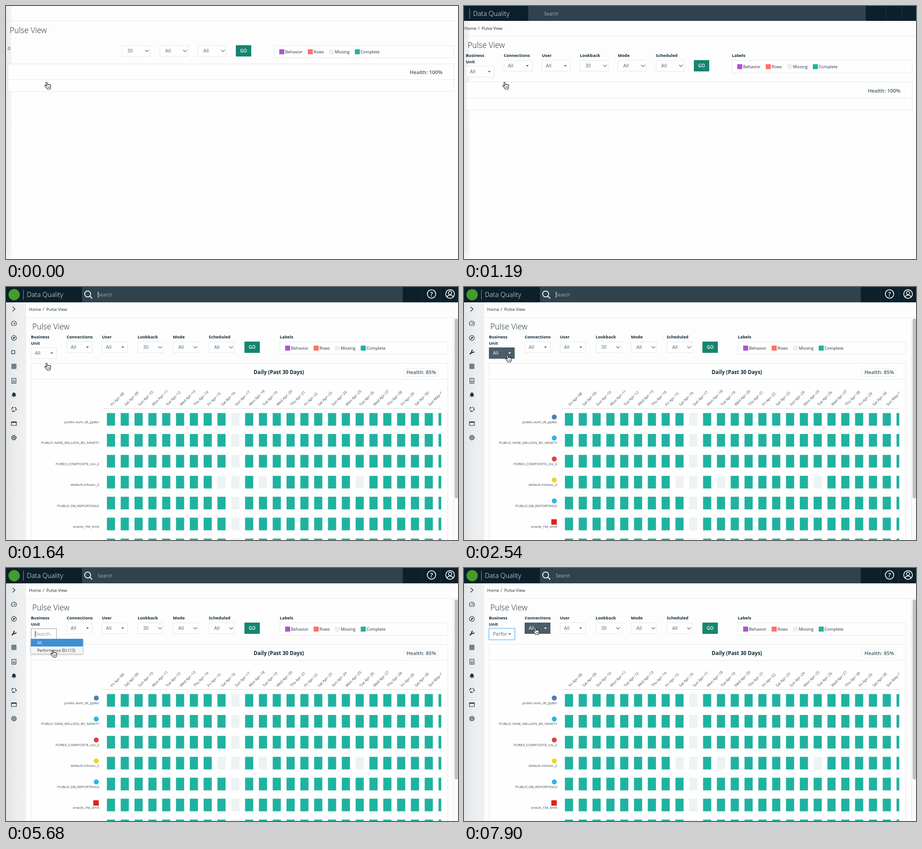
Write an HTML page that moves like this. It is 999 by 561 pixels and loops after 8 s.

```html
<!DOCTYPE html>
<html lang="en">
<head>
<meta charset="utf-8">
<title>Pulse View</title>
<style>
  html, body { margin: 0; width: 100%; height: 100%; overflow: hidden; background: #fdfdfd; }
  svg { display: block; width: 999px; height: 561px; font-family: "Open Sans", sans-serif; }
  text { white-space: pre; }
  .icon { fill: none; stroke: #1c323e; stroke-width: 1.2; }
  .icon .solid { fill: #1c323e; }
</style>
</head>
<body>
<svg id="stage" viewBox="0 0 999 561">
  <defs>
    <linearGradient id="side"><stop stop-color="#e2e4e6"/><stop offset=".6" stop-color="#eceeef"/><stop offset="1" stop-color="#eff0f1"/></linearGradient>
    <linearGradient id="sliver"><stop stop-color="#ececec"/><stop offset="1" stop-color="#f4f4f4"/></linearGradient>
    <clipPath id="chart"><rect x="216" y="206" width="746" height="355"/></clipPath>
    <filter id="soft" x="-10%" y="-20%" width="120%" height="150%"><feDropShadow dx="0" dy="1.5" stdDeviation="1.5" flood-opacity=".22"/></filter>
  </defs>
</svg>
<script>
const LOOP = 8000;
const INK = '#142b37', GREY = '#53656f', LINE = '#e3e6e7', TEAL = '#20b2a0', BLANK = '#edf2f2';
const BOLD = 'font-weight="700"', LIGHT = 'font-weight="300"';

const rect = (x, y, w, h, fill, more = '') =>
  `<rect x="${x}" y="${y}" width="${w}" height="${h}" fill="${fill}" ${more}/>`;
const frame = (x, y, w, h, fill = '#fefefe', stroke = LINE, more = '') =>
  rect(x + .5, y + .5, w - 1, h - 1, fill, `stroke="${stroke}" ${more}`);
const text = (x, y, s, size = 9.33, fill = INK, more = '') =>
  `<text x="${x}" y="${y}" font-size="${size}" fill="${fill}" ${more}>${s}</text>`;
const path = (d, stroke, width = 1, fill = 'none') =>
  `<path d="${d}" fill="${fill}" stroke="${stroke}" stroke-width="${width}"/>`;
const circle = (x, y, r, fill, more = '') => `<circle cx="${x}" cy="${y}" r="${r}" fill="${fill}" ${more}/>`;
const at = (x, y, s, cls = '') => `<g transform="translate(${x} ${y})" class="${cls}">${s}</g>`;
// Shown only during the given "from-to" spans, in ms.
const on = (spans, s) => `<g data-on="${spans}">${s}</g>`;

// Filter row geometry for the three stages of loading.
const bare = { x: 4, step: 84, w: 63, y: 87, go: 508, legend: 592, right: 991, title: 8 };
const plain = { ...bare, y: 120 };
const empty = { x: 55, step: 79.8, w: 58, y: 121, go: 533, legend: 613, right: 991, title: 58 };
const full = { x: 55, step: 78.6, w: 57, y: 121, go: 527, legend: 605, right: 977, title: 58 };
const col = (l, i) => Math.round(l.x + l.step * i);

function labels(l) {
  const names = ['Business', 'Connections', 'User', 'Lookback', 'Mode', 'Scheduled'];
  return names.map((n, i) => text(col(l, i), l.y - 7, n, 9.33, INK, BOLD)).join('')
    + text(l.x, l.y + 6.5, 'Unit', 9.33, INK, BOLD)
    + text(l.legend, l.y - 7, 'Labels', 9.33, INK, BOLD);
}

function picker(x, y, w, s, fill = '#fefefe', ink = GREY, stroke = LINE) {
  return frame(x, y, w, 25, fill, stroke) + text(x + 9, y + 16, s, 10.67, ink)
    + `<path d="M${x + w - 14} ${y + 11}h6l-3 3.4z" fill="${ink}"/>`;
}

function select(x, y, w, s) {
  const c = x + w - 7.5;
  return frame(x, y, w, 25) + text(x + 12, y + 16, s, 10.67, GREY)
    + path(`M${c - 4} ${y + 10.5}l4 4 4-4`, '#5a6870', 1.2);
}

function filters(l) {
  const keys = [['Behavior', 12, '#aa55cc'], ['Rows', 75, '#ff6f69'], ['Missing', 122, '#eceff0'], ['Complete', 179, TEAL]];
  return text(l.title, l.y - 27, 'Pulse View', 17.4, INK, LIGHT)
    + ['30', 'All', 'All'].map((s, i) => select(col(l, i + 3), l.y, l.w, s)).join('')
    + rect(l.go, l.y, 34, 25, '#158570')
    + text(l.go + 17, l.y + 16, 'GO', 10, '#fff', 'text-anchor="middle" font-weight="600"')
    + frame(l.legend, l.y, l.right - l.legend, 29)
    + keys.map(([s, dx, c]) => rect(l.legend + dx, l.y + 9, 11, 11, c) + text(l.legend + dx + 12.7, l.y + 18, s, 9.33, '#22353f')).join('');
}

const pickers = l => picker(col(l, 1), l.y, l.w, 'All') + picker(col(l, 2), l.y, l.w, 'All');
const unitPicker = l => picker(l.x, l.y + 13, l.w, 'All');

function panel(l, y, h, split, base, health, pill) {
  const end = l.right - 26.5;
  return frame(l.x, y, l.right - l.x, h) + rect(l.x, split, l.right - l.x, 1, LINE)
    + (pill ? frame(pill, base - 13, end + 5 - pill, 19, '#fefefe', '#e6eaec', 'rx="6"') : '')
    + text(end, base, 'Health: ' + health, 11.4, '#455a66', 'text-anchor="end" font-weight="600"');
}

function crumbs(x, y) {
  return text(x, y, 'Home') + text(x + 30, y, '/') + text(x + 38, y, 'Pulse View') + rect(0, y + 13, 999, 1, '#e6e8e9');
}

function header(h, x0, x1, dividers, rule, search) {
  return rect(0, 0, 999, h, '#0b202b') + rect(x0, 0, x1 - x0, h, '#2f424e')
    + dividers.map(x => rect(x, 0, 1, h, '#1c323e')).join('')
    + rect(rule, 6, 1, 22, '#8d9aa1')
    + text(rule + 8, 22, 'Data Quality', 14.67, '#fff', LIGHT)
    + text(search, 20.5, 'Search', 10.1, '#a9b4ba');
}

const sliver = y => rect(0, y, 12, 548 - y, 'url(#sliver)') + rect(0, 548, 11, 13, '#f3f3f3');

const icons = {
  49: path('M-3-5l5.5 5-5.5 5', '#1c323e', 1.4),
  81: '<path d="M-4 4a5.6 5.6 0 1 1 8 0zM0 1l3-3M-3.5 0h1.2M-1-3.6l.4 1"/>',
  113: circle(0, 0, 5.4, 'none') + '<path class="solid" stroke="none" d="M3-3L1.2 1.2-3 3-1.2-1.2z"/>',
  176: '<path d="M-4.5-5h9V5h-9zM-4.5-2h9M-4.5 1.5h9M-1.5-5V5M1.5-5V5"/>',
  208: '<path d="M-4.5-5.5h9v11h-9zM-2.5 3h5M-2.5.7h5M-1-2.7h2"/>',
  239: '<path class="solid" stroke="none" d="M-5 3.2C-3.5 1.5-4-.5-3.5-2.3A3.4 3.4 0 0 1-.7-4.8a.8.8 0 0 1 1.4 0A3.4 3.4 0 0 1 3.5-2.3C4-.5 3.5 1.5 5 3.2zM-1.5 4h3a1.5 1.5 0 0 1-3 0z"/>',
  271: '<path d="M-4.6 1.5A4.8 4.8 0 0 1-2.4-4.1M1-4.7A4.8 4.8 0 0 1 4.7 1.2M3 3.7A4.8 4.8 0 0 1-3 3.7M-4.6-3.2l2.4-1.2.4 2.4M3 .2l1.8 1.4L6.2-.2M-.6 3l-2.6.6.6 2.4"/>',
  303: '<path d="M-5.5-4h11v8h-11z"/><path class="solid" stroke="none" d="M-5.5-4.5h11v2.4h-11z"/>',
  334: circle(0, 0, 4.3, 'none') + circle(0, 0, 5.3, 'none', 'stroke-dasharray="2.1 2.06"') + circle(0, 0, 1.7, 'none')
};

const shell = header(34, 168, 877, [920, 960], 38, 203)
  + circle(18, 17, 12.5, '#439c2c')
  + circle(180.5, 15.5, 6.6, 'none', 'stroke="#fff" stroke-width="1.8"') + path('M185 20l5.5 5.5', '#fff', 2)
  + circle(940.5, 15.5, 9.3, 'none', 'stroke="#fff" stroke-width="1.7"')
  + text(940.5, 20.5, '?', 14, '#fff', 'text-anchor="middle" font-weight="600"')
  + circle(981.5, 15.5, 9.6, 'none', 'stroke="#fff" stroke-width="1.7"')
  + circle(981.5, 13, 3.6, 'none', 'stroke="#fff" stroke-width="1.6"') + path('M975 22.5c1-6 12-6 13 0', '#fff', 1.6)
  + rect(0, 34, 44, 527, 'url(#side)') + rect(43, 34, 1, 527, '#e2e5e6')
  + Object.entries(icons).map(([y, s]) => at(17.5, y, s, 'icon')).join('')
  + on('1340-1790', at(16, 144.5, rect(-3.5, -3.5, 7, 7, 'none'), 'icon'))
  + on('1790-8000', at(17.5, 144.5, path('M-4.6 4.6L1-1', '#1c323e', 2.8) + path('M2-4.6A2.7 2.7 0 1 0 4.8-1.6', '#1c323e', 2)))
  + rect(44, 67, 955, 1, '#e6e8e9') + text(51, 53.3, 'Home') + text(81, 53.3, '/') + text(89, 53.3, 'Pulse View')
  + on('1340-2090 2540-2990 3440-3740', rect(203, 10, 1, 14, '#dfe5e8'));

function chart() {
  const days = ['Fri', 'Sat', 'Sun', 'Mon', 'Tue', 'Wed', 'Thu'];
  const rows = ['public.aum_dt_pjdbc', 'PUBLIC.NINE_MILLION_BY_NINETY', 'FOREX_COMPOSITE_csv_2',
    'default.infosec_2', 'PUBLIC.DB_REPORTING2', 'oracle_1M_limit', ''];
  const marks = ['#4a7fb0', '#29b5e8', '#d9453a', '#f5d21f', '#29b5e8'];
  let cells = '', names = '', badges = '';
  for (let c = 0; c < 25; c++) {
    const x = 223 + c * 30.54, d = c + 8;
    const date = d > 30 ? 'May−0' + (d - 30) : 'Apr−' + String(d).padStart(2, '0');
    cells += text(0, 0, days[c % 7] + ' ' + date, 8, '#3b4a52', `transform="translate(${x + 11.5} 264) rotate(-45)"`);
    rows.forEach((_, r) => {
      const gap = c === 9 || (r === 3 && [8, 11, 18].includes(c));
      cells += rect(x, 279.5 + r * 46.4, 18, 28, gap ? BLANK : TEAL);
    });
  }
  rows.forEach((s, r) => names += text(206, 302 + r * 46.4, s, 8, '#3b4a52', 'text-anchor="end"'));
  marks.forEach((m, r) => badges += circle(199.5, 288.3 + r * 46.5, 5.5, m));
  badges += rect(193, 515, 12, 12, '#e2231a');
  return text(603, 193, 'Daily (Past 30 Days)', 11.5, INK, 'text-anchor="middle" ' + BOLD)
    + rect(216, 269, 746, 1, '#d6dadc') + `<g clip-path="url(#chart)">${cells}</g>` + names + on('1790-8000', badges);
}

const menu = `<g filter="url(#soft)">${frame(54, 157, 117, 34, '#fff', '#c6c9cb', 'rx="1.5"')}</g>`
  + rect(55, 157, 115, 17, '#3f8fd2') + on('4640-7170', rect(55, 174, 115, 16, '#f3f3f3'))
  + text(69, 169, 'All', 8.67, '#fff') + text(69, 185.5, 'Performance BU (13)', 8.67, '#2c3a42');

const dark = (x, y, s) => picker(x, y, 57, s, '#4a5d69', '#fff', '#4a5d69');
const faded = s => `<g opacity=".5">${s}</g>`;

const unit = on('1640-3740', unitPicker(full))
  + on('2090-2240', faded(dark(55, 134, 'All')))
  + on('2240-3740', dark(55, 134, 'All'))
  + on('3740-7170', frame(55, 134, 57, 25, '#fff', '#8f9aa1') + text(64, 150, 'Search.', 10.67, '#8b9297')
    + on('3890-4340 4780-5230 5680-6280 6730-7170', rect(64, 139, 1, 15, '#222')) + menu)
  + on('7170-8000', rect(54, 133.5, 59, 26, 'none', 'stroke="#007bff" stroke-opacity=".22" stroke-width="2.4" rx="1.5"')
    + picker(55, 134, 57, 'Perfor', '#fefefe', GREY, '#93c5f3'));

const hand = '<g id="hand">'
  + path('M4.6.8C3.5.8 3 1.8 3.3 2.8L5 9.4C3.6 8.2 2.2 7.2 1.1 7.8.3 8.3.6 9.2 1.3 10L5 14.2C5.8 15.2 6 15.6 6.2 16.3H12.2C12.3 15 13.8 13 13.8 10.5V8C13.8 6.4 12 6.2 11.7 7.4 11.6 5.8 9.6 5.6 9.2 6.8 9 5.6 7.4 5.4 6.9 6.4L5.9 2C5.7 1.2 5.3.8 4.6.8Z', '#111', 1.1, '#fff')
  + path('M7.3 10.5l.4 3M9.3 10.3l.2 3M11.3 10.2l-.1 3', '#111', .8) + '</g>';
const beam = '<g id="beam">' + path('M-2.5-6.5Q0-6.5 0-5V5Q0 6.5-2.5 6.5M2.5-6.5Q0-6.5 0-5V5Q0 6.5 2.5 6.5M-1.5 2h3', '#111', 1.2) + '</g>';

document.getElementById('stage').innerHTML += rect(0, 0, 999, 561, '#fdfdfd')
  + on('0-1190', sliver(0) + rect(0, 32, 999, 1, '#e6e8e9') + filters(bare) + panel(bare, 128, 62, 163, 151, '100%')
    + on('0-140', text(4, 97, '()')) + on('140-1190', labels(bare) + text(4, 110, '()')))
  + on('1190-1340', sliver(33) + header(33, 142, 888, [932, 967], 12, 177) + crumbs(1, 52.5) + filters(plain) + labels(plain)
    + pickers(plain) + unitPicker(plain) + panel(plain, 168, 63, 204, 192.3, '100%'))
  + on('1340-8000', shell)
  + on('1340-1640', filters(empty) + labels(empty) + pickers(empty) + unitPicker(empty) + panel(empty, 169, 63, 204, 193.3, '100%', 885))
  + on('1640-8000', filters(full) + labels(full) + pickers(full) + panel(full, 169, 420, 204, 193.3, '85%', 878) + chart()
    + rect(988, 68, 11, 493, '#fafafa') + rect(988, 68, 1, 493, '#e8e8e8') + rect(991.5, 70, 7.5, 399, '#c1c1c1', 'rx="3.7"')
    + on('7760-7900', faded(dark(134, 121, 'All'))) + on('7900-8000', dark(134, 121, 'All')) + unit)
  + hand + beam;

// Pointer moves: [time, from, to, share of the way].
const spots = { rest: [85, 168], unit: [91, 150.5], item: [98.3, 181.5], conn: [152, 131.5] };
const moves = [
  [0, 'rest', 'unit', 0], [1940, 'rest', 'unit', .5], [2090, 'rest', 'unit', 1],
  [4190, 'unit', 'item', .1], [4340, 'unit', 'item', .35], [4490, 'unit', 'item', .65], [4640, 'unit', 'item', .9], [4780, 'unit', 'item', 1],
  [7170, 'item', 'conn', 0], [7320, 'item', 'conn', .1], [7470, 'item', 'conn', .35], [7620, 'item', 'conn', .65],
  [7760, 'item', 'conn', .9], [7900, 'item', 'conn', 1]
];

const timed = [...document.querySelectorAll('[data-on]')].map(el =>
  ({ el, spans: el.dataset.on.split(' ').map(s => s.split('-').map(Number)) }));
const handEl = document.getElementById('hand'), beamEl = document.getElementById('beam');
const show = (el, yes) => { el.style.display = yes ? '' : 'none'; };
const start = performance.now();

function draw() {
  const t = (performance.now() - start) % LOOP;
  for (const { el, spans } of timed) show(el, spans.some(([a, b]) => t >= a && t < b));
  const [, from, to, k] = moves.findLast(m => m[0] <= t);
  const [x, y] = spots[from].map((v, i) => v + (spots[to][i] - v) * k);
  const typing = t >= 3890 && t < 4340;
  show(handEl, !typing);
  show(beamEl, typing);
  handEl.setAttribute('transform', `translate(${x} ${y})`);
  beamEl.setAttribute('transform', `translate(${x + 4.5} ${y + .8})`);
  requestAnimationFrame(draw);
}
draw();
</script>
</body>
</html>
```
